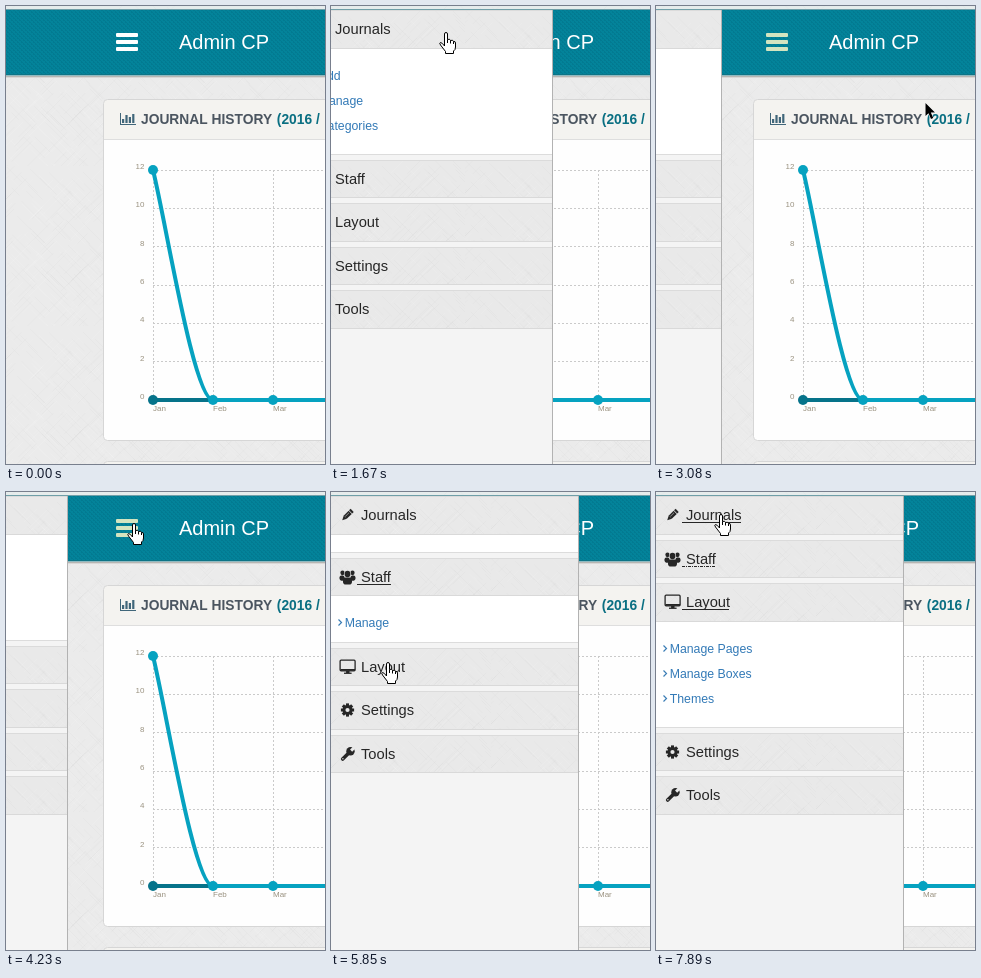
Animation of 319x458 px, one loop 8 s. Source, as an HTML page with a canvas:

```html
<!DOCTYPE html>
<html lang="en">
<head>
<meta charset="utf-8">
<title>Admin CP</title>
<style>
html, body { margin: 0; width: 100%; height: 100%; overflow: hidden; background: #ebebeb; }
canvas { display: block; width: 319px; height: 458px; }
</style>
</head>
<body>
<canvas id="stage"></canvas>
<script>
const W = 319, H = 458, LOOP = 8000, MENU_W = 248;
const FONT = '"Liberation Sans", Arial, sans-serif';
const canvas = document.getElementById('stage');
const scale = window.devicePixelRatio || 1;
canvas.width = W * scale;
canvas.height = H * scale;
const ctx = canvas.getContext('2d');

// ---------- timing ----------
function ease(x) { // cubic-bezier(.25, .1, .25, 1)
  if (x <= 0) return 0;
  if (x >= 1) return 1;
  let lo = 0, hi = 1, s = 0.5;
  for (let i = 0; i < 24; i++) {
    s = (lo + hi) / 2;
    const bx = 0.75 * s * (1 - s) + s * s * s;
    if (bx < x) lo = s; else hi = s;
  }
  return 0.3 * s * (1 - s) * (1 - s) + 3 * s * s * (1 - s) + s * s * s;
}

// Index of the current step out of n between a and b; -1 before the start.
function stepAt(t, a, b, n) {
  if (t + 1 < a) return -1;
  return Math.min(n - 1, Math.floor((t + 1 - a) / (b - a) * (n - 1)));
}

function tween(t, a, b, n, start, dur) {
  const k = stepAt(t, a, b, n);
  if (k < 0) return 0;
  if (k === n - 1) return 1;
  return ease((a + k * (b - a) / (n - 1) - start) / dur);
}

function menuWidth(t) {
  const open1 = tween(t, 1440, 1760, 5, 1416, 300);
  const close = tween(t, 2930, 3160, 4, 2875, 300);
  const open2 = tween(t, 4230, 4470, 4, 4176, 300);
  return Math.round(MENU_W * (open1 - close + open2));
}

// ---------- pointer ----------
const moves = [
  { a: 210, b: 830, n: 9, from: [212, 347], ctrl: [165, 150], to: [113, 26] },
  { a: 1990, b: 2380, n: 6, from: [113, 26], ctrl: [200, 40], to: [267, 96] },
  { a: 2530, b: 2531, n: 2, from: [267, 96], ctrl: [269, 97], to: [269, 97] },
  { a: 3310, b: 3770, n: 7, from: [269, 97], ctrl: [190, 70], to: [126, 31] },
  { a: 4630, b: 5150, n: 8, from: [126, 31], ctrl: [105, 120], to: [55, 170] },
  { a: 6150, b: 6170, n: 2, from: [55, 170], ctrl: [53, 173], to: [51, 174] },
  { a: 6400, b: 6560, n: 3, from: [51, 174], ctrl: [50, 160], to: [51, 168] },
  { a: 7490, b: 7890, n: 6, from: [51, 168], ctrl: [89, 75], to: [63, 22] }
];
const handTimes = [[750, 1990], [3690, 4630], [5074, 6940], [7808, LOOP]];

function pointerAt(t) {
  let pos = null;
  for (const m of moves) {
    const k = stepAt(t, m.a, m.b, m.n);
    if (k < 0) break;
    const x = (k + 1) / m.n, u = x * x * (3 - 2 * x);
    pos = [0, 1].map(i => Math.round(
      (1 - u) * (1 - u) * m.from[i] + 2 * u * (1 - u) * m.ctrl[i] + u * u * m.to[i]));
  }
  return pos;
}

const arrowPath = new Path2D('M.5 0V13L3.5 10.3L6 16L8.3 15L5.8 9.5H10Z');
const handPath = new Path2D('M5.5 14V2Q5.5.5 7 .5T8.5 2V7.5Q11 6.5 11.5 8.5Q14 7.5 14.5 9.5Q16.5 9 16.5 11V15Q16.5 18 14.5 19V21.5H6.5V19.5L1.5 13Q0 10.5 1.5 10.5T5.5 14Z');
const fingers = new Path2D('M8.5 7.5V11M11.5 8.5V11.5M14.5 9.5V12');

function drawPointer(t) {
  const p = pointerAt(t);
  if (!p) return;
  const hand = handTimes.some(([a, b]) => t + 1 >= a && t + 1 < b);
  ctx.save();
  ctx.translate(p[0] - (hand ? 5 : 0), p[1]);
  ctx.lineWidth = 1;
  ctx.fillStyle = hand ? '#fff' : '#000';
  ctx.strokeStyle = hand ? '#000' : '#fff';
  if (hand) {
    ctx.fill(handPath);
    ctx.stroke(handPath);
    ctx.stroke(fingers);
  } else {
    ctx.stroke(arrowPath);
    ctx.fill(arrowPath);
  }
  ctx.restore();
}

// ---------- drawing helpers ----------
function rect(x, y, w, h, color) {
  ctx.fillStyle = color;
  ctx.fillRect(x, y, w, h);
}

function text(str, x, y, font, color, align = 'left') {
  ctx.font = font + ' ' + FONT;
  ctx.fillStyle = color;
  ctx.textAlign = align;
  ctx.fillText(str, x, y);
}

function line(x1, y1, x2, y2) {
  ctx.beginPath();
  ctx.moveTo(x1, y1);
  ctx.lineTo(x2, y2);
  ctx.stroke();
}

function dot(x, y, r, color) {
  ctx.fillStyle = color;
  ctx.beginPath();
  ctx.arc(x, y, r, 0, Math.PI * 2);
  ctx.fill();
}

function makeTile(size, paint) {
  const c = document.createElement('canvas');
  c.width = c.height = size;
  paint(c.getContext('2d'));
  return ctx.createPattern(c, 'repeat');
}

// Faint crossed scratches for the grey surfaces.
const scratches = makeTile(160, g => {
  let seed = 7;
  const rnd = () => (seed = seed * 16807 % 2147483647) / 2147483647;
  for (let i = 0; i < 420; i++) {
    const x = rnd() * 160, y = rnd() * 160, len = 6 + rnd() * 22;
    const dir = rnd() < 0.5 ? 1 : -1;
    g.strokeStyle = rnd() < 0.5 ? 'rgba(0,0,0,.02)' : 'rgba(255,255,255,.12)';
    g.beginPath();
    g.moveTo(x, y);
    g.lineTo(x + len * dir, y + len);
    g.stroke();
  }
});

const weave = makeTile(4, g => {
  g.fillStyle = 'rgba(0,50,70,.1)';
  for (let i = 0; i < 4; i++) g.fillRect(i, i, 1, 1);
  g.fillRect(3, 0, 1, 1);
  g.fillRect(1, 2, 1, 1);
});

function surface(x, y, w, h, color, pattern) {
  rect(x, y, w, h, color);
  ctx.save();
  ctx.translate(x, y);
  ctx.fillStyle = pattern;
  ctx.fillRect(0, 0, w, h);
  ctx.restore();
}

// ---------- page ----------
function drawHeader(t) {
  surface(0, 0, W, 3, '#e6ecec', scratches);
  surface(0, 4, W, 65, '#03839a', weave);
  rect(0, 3, W, 1, '#6f9fa8');
  rect(0, 68, W, 1, '#0d7486');
  rect(0, 69, W, 1, '#8fbac1');
  rect(0, 70, W, 1, '#b7b5b2');
  rect(0, 71, W, 1, '#d9d8d7');
  ctx.fillStyle = t + 1 >= 750 ? '#d3e4c0' : '#fff';
  for (let i = 0; i < 3; i++) {
    ctx.beginPath();
    ctx.roundRect(110, 27 + i * 7, 22, 4, 1);
    ctx.fill();
  }
  text('Admin CP', 173, 43, '20px', '#fff');
}

function drawChart() {
  const left = 147, gap = 60, top = 164, base = 394, row = (base - top) / 6;
  const light = '#06a2c0', dark = '#06738a';
  ctx.lineWidth = 1;
  ctx.strokeStyle = '#cacaca';
  ctx.setLineDash([2, 2]);
  for (let i = 0; i <= 6; i++) {
    const y = Math.floor(top + i * row) + 0.5;
    line(left, y, W, y);
    text(String(12 - 2 * i), 138.5, Math.round(top + i * row) - 1, '8px', '#9a9280', 'right');
  }
  ['Jan', 'Feb', 'Mar'].forEach((m, i) => {
    line(left + 0.5 + i * gap, top, left + 0.5 + i * gap, base);
    text(m, left + i * gap, 405, '8px', '#9a9280');
  });
  ctx.setLineDash([]);
  ctx.lineWidth = 4;
  ctx.strokeStyle = dark;
  line(left, base, left + gap, base);
  dot(left, base, 5, dark);
  ctx.strokeStyle = light;
  ctx.beginPath();
  ctx.moveTo(left, top);
  ctx.bezierCurveTo(left + 14, 221.5, left + 41, base, left + gap, base);
  ctx.lineTo(W + 2, base);
  ctx.stroke();
  dot(left, top, 5, light);
  dot(left + gap, base, 5, light);
  dot(left + 2 * gap, base, 5, light);
}

function card(y, h) {
  ctx.beginPath();
  ctx.roundRect(97.5, y + 0.5, 300, h, 4);
  ctx.fillStyle = '#fefefe';
  ctx.fill();
  ctx.save();
  ctx.clip();
  rect(98, y, 300, 41, '#f4f3f0');
  rect(98, y + 40, 300, 1, '#dedede');
  ctx.restore();
  ctx.lineWidth = 1;
  ctx.strokeStyle = '#d6d6d6';
  ctx.stroke();
}

function drawPage(t) {
  surface(0, 0, W, H, '#ebebeb', scratches);
  drawHeader(t);
  card(93, 341);
  card(455, 200);
  const ink = '#40667a';
  rect(114, 107, 1, 12, ink);
  rect(114, 118, 16, 1, ink);
  [4, 8, 6, 9].forEach((h, i) => rect(116 + i * 3.4, 117 - h, 2.2, h, ink));
  text('JOURNAL HISTORY', 135, 118, 'bold 13.8px', '#4b5560');
  text('(2016 /', 270.8, 118, 'bold 13.8px', '#0a6f82');
  drawChart();
}

// ---------- menu icons, centred on 0,0 ----------
const INK = '#262626';
const icons = {
  pencil() {
    ctx.rotate(Math.PI / 4);
    ctx.scale(0.88, 0.88);
    rect(-2.5, -7.5, 5, 2.5, INK);
    rect(-2.5, -4.3, 5, 8, INK);
    ctx.fill(new Path2D('M-2.5 3.5H2.5L0 8.5Z'));
    rect(-0.9, -3, 0.8, 6, '#999');
  },
  users() {
    ctx.scale(0.94, 1.05);
    for (const s of [-1, 1]) {
      dot(s * 5.3, -4, 2.3, INK);
      ctx.beginPath();
      ctx.roundRect(s * 5.8 - 2.7, -1.5, 5.4, 5, 2);
      ctx.fill();
    }
    dot(0, -2.8, 3.7, '#e9e9e9');
    dot(0, -2.8, 3.1, INK);
    ctx.beginPath();
    ctx.roundRect(-4.8, 0.5, 9.6, 6.7, 3);
    ctx.fill();
  },
  desktop() {
    ctx.lineWidth = 1.3;
    ctx.strokeStyle = INK;
    ctx.beginPath();
    ctx.roundRect(-7.4, -6.8, 15, 10.6, 1);
    ctx.stroke();
    rect(-7, 2, 14.6, 1.8, INK);
    rect(-1.4, 4, 3.4, 2, INK);
    rect(-3.5, 5.6, 7.6, 1.3, INK);
  },
  cog() {
    for (let i = 0; i < 8; i++) {
      rect(-1.5, -6.6, 3, 4, INK);
      ctx.rotate(Math.PI / 4);
    }
    dot(0, 0, 5, INK);
    dot(0, 0, 2.1, '#e9e9e9');
  },
  wrench() {
    ctx.strokeStyle = INK;
    ctx.lineCap = 'round';
    ctx.lineWidth = 3.6;
    line(-4.8, 5, 1.5, -1.2);
    dot(3, -2.8, 4.2, INK);
    ctx.strokeStyle = '#e9e9e9';
    ctx.lineCap = 'butt';
    ctx.lineWidth = 3;
    line(3.6, -3.4, 8, -7.6);
    dot(-4.6, 4.8, 0.7, '#e9e9e9');
  }
};

// ---------- menu ----------
const HEAD = 38.5, PITCH = 43.5, TALL = 106.3, SHORT = 56.3;
const sections = [
  { name: 'Journals', icon: 'pencil', width: 59, items: ['Add', 'Manage', 'Categories'] },
  { name: 'Staff', icon: 'users', width: 34, items: ['Manage'] },
  { name: 'Layout', icon: 'desktop', width: 47, items: ['Manage Pages', 'Manage Boxes', 'Themes'] },
  { name: 'Settings', icon: 'cog', items: [] },
  { name: 'Tools', icon: 'wrench', items: [] }
];

function drawItems(items, top, h) {
  rect(0, top, MENU_W, h, '#fff');
  ctx.save();
  ctx.beginPath();
  ctx.rect(0, top, MENU_W, h);
  ctx.clip();
  items.forEach((item, i) => {
    const y = top + 27 + i * 25;
    ctx.strokeStyle = '#3a7db5';
    ctx.lineWidth = 1.2;
    ctx.stroke(new Path2D(`M7.5 ${y - 3.5}l3 3l-3 3`));
    text(item, 13.7, y + 4, '12.3px', '#337ab7');
  });
  ctx.restore();
  rect(0, top + h - 1, MENU_W, 1, '#dcdcdc');
}

function drawSection(sec, y, h, underline) {
  const top = Math.round(y), bottom = Math.round(y + HEAD), mid = top + 19;
  surface(0, top, MENU_W, bottom - top, '#e9e9e9', scratches);
  rect(0, top, MENU_W, 1, '#dbdbdb');
  rect(0, bottom - 1, MENU_W, 1, '#d9d9d9');
  ctx.save();
  ctx.translate(16.5, mid);
  ctx.fillStyle = INK;
  icons[sec.icon]();
  ctx.restore();
  text(sec.name, 30, mid + 5, '14.7px', INK);
  if (underline) {
    ctx.strokeStyle = INK;
    ctx.lineWidth = 1;
    ctx.setLineDash(underline === 'dotted' ? [3, 1, 1, 1] : []);
    line(26, mid + 7.5, 26 + sec.width, mid + 7.5);
    ctx.setLineDash([]);
  }
  if (h > 0.5) drawItems(sec.items, bottom, Math.round(y + HEAD + h) - bottom);
}

function drawMenu(t) {
  const w = menuWidth(t);
  if (w <= 0) return;
  const toStaff = tween(t, 5630, 5930, 5, 5595, 350);
  const toLayout = tween(t, 6940, 7320, 6, 6943, 350);
  const heights = [TALL * (1 - toStaff), SHORT * (toStaff - toLayout), TALL * toLayout, 0, 0];
  const lines = [
    t + 1 >= 7808,
    t + 1 >= 6790 ? 'dotted' : t + 1 >= 5074,
    t + 1 >= 5930
  ];
  ctx.save();
  ctx.beginPath();
  ctx.rect(0, 4, w, H);
  ctx.clip();
  ctx.translate(w - MENU_W, 0);
  rect(0, 4, MENU_W, H, '#f4f4f4');
  let y = 4;
  sections.forEach((sec, i) => {
    drawSection(sec, y, heights[i], lines[i]);
    y += PITCH + heights[i];
  });
  rect(MENU_W - 1, 4, 1, H, '#b2b2b2');
  ctx.restore();
}

function frame(now) {
  const t = now % LOOP;
  ctx.setTransform(scale, 0, 0, scale, 0, 0);
  drawPage(t);
  drawMenu(t);
  drawPointer(t);
  requestAnimationFrame(() => frame(performance.now() - begin));
}
const begin = performance.now();
frame(0);
</script>
</body>
</html>
```
